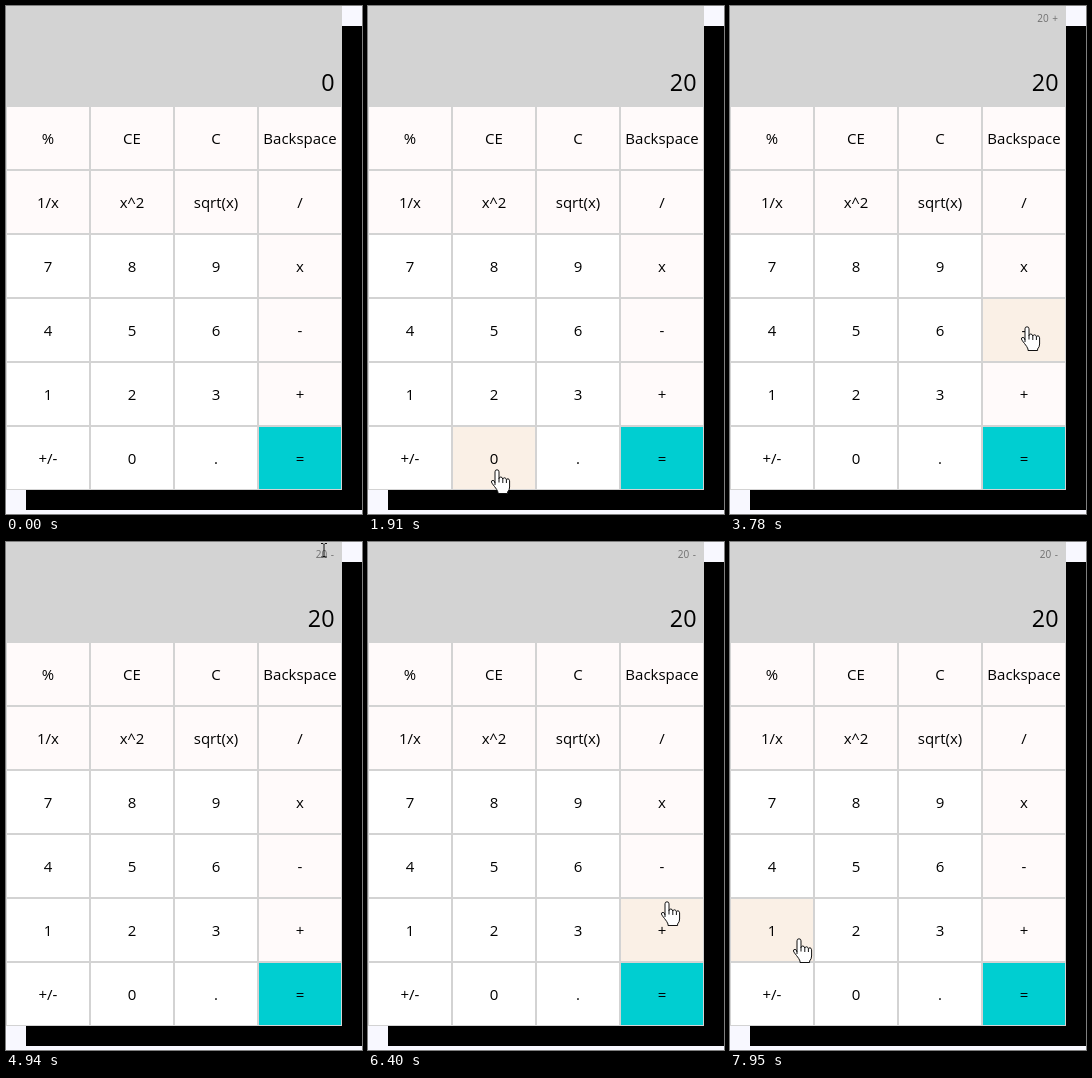
Recreate the animation shown at these times as an HTML page. Size 356x508 px, loop 8 s.

```html
<!DOCTYPE html>
<html lang="en">
<head>
<meta charset="utf-8">
<title>Calculator</title>
<style>
html, body { margin: 0; width: 100%; height: 100%; overflow: hidden; background: #f8f8ff; }
svg { display: block; width: 100%; height: 100%; }
text { font-family: "Open Sans", "Noto Sans", sans-serif; font-size: 15px; text-anchor: middle; }
#value { font-size: 23.3px; text-anchor: end; }
#history { font-size: 10px; text-anchor: end; word-spacing: 1px; fill: #707070; }
</style>
</head>
<body>
<svg viewBox="0 0 356 508">
  <rect width="356" height="508" fill="#f8f8ff"/>
  <rect x="20" y="20" width="336" height="484"/>
  <rect width="336" height="484" fill="#d3d3d3"/>
  <text id="history" x="328" y="16"></text>
  <text id="value" x="328.5" y="85"></text>
  <g id="keys"></g>
  <g id="cursor" stroke="#111" fill="#fff" stroke-linejoin="round">
    <path id="arrow" d="M0 0V17L4 13L6.5 19L9 18L6.5 12.5H12Z"/>
    <path id="beam" fill="none" d="M-3-6.5H-1L0-5.5L1-6.5H3M0-5.5V6M-3 7H-1L0 6L1 7H3"/>
    <g id="hand">
      <path d="M-2 15V1.8a2 2 0 0 1 4 0V8.5q.3-1.5 1.8-1.5t2 2q.4-1.2 1.8-1.2t1.8 2q.4-1 1.6-1t1.6 2V17q0 3-2 5v1.5H1V22q-1-2.5-3.5-5.5T-5.6 12q0-1.6 1.6-1.6T-2 13"/>
      <path fill="none" d="M2 8v4.5M5.8 9v4M9.4 10v3"/>
    </g>
  </g>
</svg>
<script>
const LOOP = 8000, START = 436, TICK = 77.32;
const KEY_W = 84, KEY_H = 64, KEYS_TOP = 100;
const LABELS = '% CE C Backspace 1/x x^2 sqrt(x) / 7 8 9 x 4 5 6 - 1 2 3 + +/- 0 . ='.split(' ');
const $ = id => document.getElementById(id);

function add(parent, tag, attrs, text = '') {
  const node = document.createElementNS('http://www.w3.org/2000/svg', tag);
  for (const name in attrs) node.setAttribute(name, attrs[name]);
  node.textContent = text;
  return parent.appendChild(node);
}

function keyColor(i) {
  if (LABELS[i] === '=') return '#00ced1';
  return i < 8 || i % 4 === 3 ? '#fffafa' : '#fff';
}

function keyCenter(label) {
  const i = LABELS.indexOf(label);
  return { x: (i % 4 + 0.5) * KEY_W, y: KEYS_TOP + (Math.floor(i / 4) + 0.5) * KEY_H };
}

function keyAt({ x, y }) {
  if (x >= 4 * KEY_W || y < KEYS_TOP || y >= KEYS_TOP + 6 * KEY_H) return -1;
  return Math.floor((y - KEYS_TOP) / KEY_H) * 4 + Math.floor(x / KEY_W);
}

const faces = LABELS.map(label => {
  const { x, y } = keyCenter(label);
  const face = add($('keys'), 'rect', { x: x - KEY_W / 2 + 1, y: y - KEY_H / 2 + 1, width: KEY_W - 2, height: KEY_H - 2 });
  add($('keys'), 'text', { x, y: y + 5.8 }, label);
  return face;
});

// A pointer move towards a key, offset from its centre; bow bends the way sideways.
function move(from, to, label, { dx = 3, dy = -3, bow = 0 } = {}) {
  const { x, y } = keyCenter(label);
  return { from, to, x: x + dx, y: y + dy, bow };
}

const ENTRY = { x: 259, y: 495 };
const MOVES = [
  move(0, 9, '2'),
  move(10, 15, '0', { dy: 12 }),
  move(22, 27, '3', { dx: 6, dy: -11 }),
  move(27, 29, '+', { dx: -25 }),
  move(37, 43, '-', { bow: 42 }),
  move(51, 58, 'Backspace', { dx: 24, dy: -124 }),
  move(58, 66, '+', { bow: 28 }),
  move(70, 73, '-'),
  move(75, 77, '+', { dx: 5, dy: -28 }),
  move(81, 84, '-', { dy: 6 }),
  move(91, 97, '1', { dx: 27, dy: 9 })
];
const PRESSES = [[11, '2'], [19, '0'], [34, '+'], [49, '-'], [70, '+'], [75, '-'], [80, '+'], [86, '-']];

function pointerAt(tick) {
  let { x, y } = ENTRY;
  for (const m of MOVES) {
    const p = Math.min(1, Math.max(0, (tick - m.from) / (m.to - m.from)));
    x += (m.x - x) * p + m.bow * Math.sin(Math.PI * p);
    y += (m.y - y) * p;
  }
  return { x: Math.round(x), y: Math.round(y) };
}

function calculatorAt(tick) {
  let value = '', history = '';
  for (const [at, key] of PRESSES) {
    if (at > tick) break;
    if (/\d/.test(key)) value += key;
    else history = `${value} ${key}`;
  }
  return { value: value || '0', history };
}

function cursorKind(point, hover) {
  if (hover >= 0) return 'hand';
  const overText = point.x > 300 && point.x < 329 && (point.y < 20 || point.y > 64 && point.y < 96);
  return overText ? 'beam' : 'arrow';
}

function render(time) {
  const tick = Math.floor((time % LOOP - START) / TICK);
  const active = tick >= 0;
  const point = pointerAt(tick);
  const hover = active ? keyAt(point) : -1;
  const kind = active && cursorKind(point, hover);
  const { value, history } = calculatorAt(tick);

  faces.forEach((face, i) => face.setAttribute('fill', i === hover ? '#faf0e6' : keyColor(i)));
  $('value').textContent = value;
  $('history').textContent = history;
  $('cursor').setAttribute('transform', `translate(${point.x} ${point.y})`);
  for (const id of ['arrow', 'beam', 'hand']) {
    $(id).setAttribute('visibility', id === kind ? 'visible' : 'hidden');
  }
}

const begin = performance.now();
function loop() {
  render(performance.now() - begin);
  requestAnimationFrame(loop);
}
loop();
</script>
</body>
</html>
```
